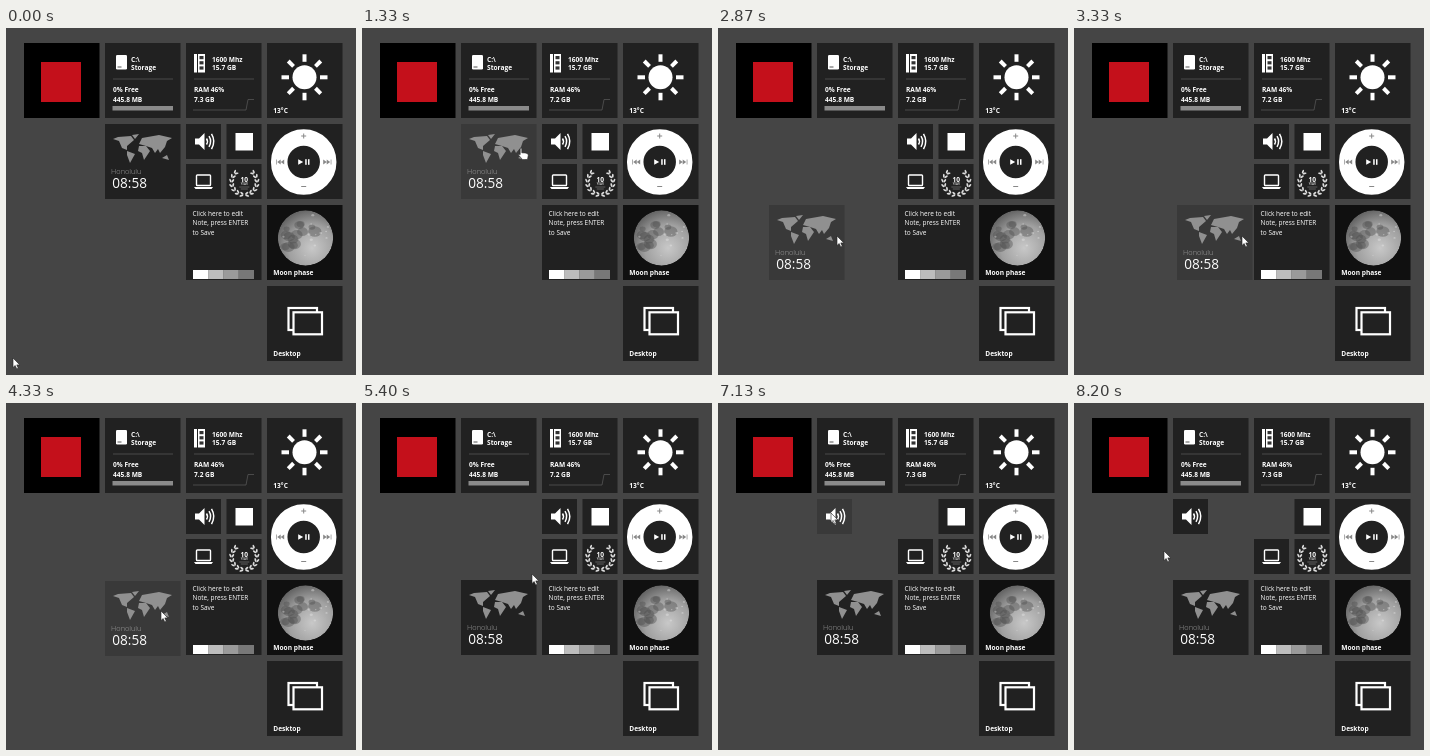
Recreate the animation shown at these times as an HTML page. Size 350 by 347 pixels, loop 9200 ms.

```html
<!DOCTYPE html>
<html lang="en">
<head>
<meta charset="utf-8">
<title>Tile desktop</title>
<style>
  html, body { margin: 0; width: 100%; height: 100%; overflow: hidden; background: #454545; }
  svg { display: block; width: 100%; height: 100%; }
  text { font: 6.5px "Open Sans", "Noto Sans", sans-serif; fill: #fff; }
  .bold { font-size: 6.6px; font-weight: 700; }
  .city { font-size: 7.4px; font-weight: 300; fill: #a0a0a0; }
  .time { font-size: 13.6px; }
  .tile { fill: #212121; }
  .hover .tile { fill: #393939; }
  .white { fill: #fff; }
  .rule { fill: none; stroke: #555; stroke-width: .8; }
</style>
</head>
<body>
<svg viewBox="0 0 350 347">
  <defs>
    <radialGradient id="moonlight" cx=".62" cy=".68" r=".7">
      <stop offset="0" stop-color="#c8c8c8"/>
      <stop offset=".6" stop-color="#a0a0a0"/>
      <stop offset="1" stop-color="#646464"/>
    </radialGradient>
    <clipPath id="disc"><circle r="27.7"/></clipPath>
  </defs>
  <g id="tiles"></g>
  <g id="cursor" fill="#fff" stroke="#222" stroke-width=".6" stroke-linejoin="round">
    <path id="arrow" d="M0 0v9.5l2.2-2 1.5 3.4 1.6-.7-1.5-3.3h3z"/>
    <path id="hand" d="M-.8 .8q.8-1.4 1.6 0v4l3.3 .1 1.700 .5q1.600 .3 1.500 1.800l-.8 4.300h-5l-4-4.500q.2-1.500 1.700-.4z"/>
  </g>
</svg>

<script>
const LOOP = 9200, FPS = 15, PITCH = 81;
const $ = id => document.getElementById(id);

// ---- Drawing helpers ----
const repeat = (n, draw) => Array.from({ length: n }, (_, i) => draw(i)).join("");
const mirrored = content => [-1, 1].map(s => `<g transform="scale(${s} 1)">${content}</g>`).join("");
const at = (x, y, content) => `<g transform="translate(${x} ${y})">${content}</g>`;
const rect = (x, y, w, h, attrs = 'class="white"') =>
  `<rect x="${x}" y="${y}" width="${w}" height="${h}" ${attrs}/>`;
const path = (d, attrs = 'class="white"') => `<path d="${d}" ${attrs}/>`;
const text = (x, y, words, attrs = 'class="bold"') => `<text x="${x}" y="${y}" ${attrs}>${words}</text>`;

const largeTile = (content, attrs = 'class="tile"') => rect(0, 0, 75.5, 75, attrs) + content;
const smallTile = content => rect(0, 0, 35, 35, 'class="tile"') + content;
const cell = (col, row, content) => at(18 + PITCH * col, 15 + PITCH * row, content);

function meter(icon, title, subtitle, label, value, graph) {
  return largeTile(icon + text(26, 18.5, title) + text(26, 26.5, subtitle) +
    path("M8 36h60", 'class="rule"') + text(8, 49, label) + value + graph);
}

// ---- Tile contents ----
const drive = rect(11, 12, 11, 14.5, 'rx="1.3" class="white"') + path("M12.5 24h4", 'stroke="#555"');
const chips = rect(8, 11, 3, 18.5) + rect(12, 11, 7, 18.5) +
  repeat(3, i => rect(13.5, 13 + 5.2 * i, 4, 3.2, 'fill="#333"'));
const storage = meter(drive, "C:\\", "Storage", "0% Free", text(8, 59, "445.8 MB"),
  rect(7.5, 63, 60.5, 4.5, 'fill="#8a8a8a"'));
const memory = meter(chips, "1600 Mhz", "15.7 GB", "RAM 46%", text(8, 59, "", 'id="memory" class="bold"'),
  path("M7 67h53l2-10.5h6", 'class="rule"'));

const weather = largeTile(at(37.5, 34.3, '<circle r="12" class="white"/>' +
  repeat(8, i => path("M0 15.5v7.5", `stroke="#fff" stroke-width="4" transform="rotate(${45 * i})"`))) +
  text(6.3, 70, "13°C"));

const player = largeTile(at(36.7, 38,
  '<circle r="24.5" fill="none" stroke="#fff" stroke-width="16.5"/>' +
  path("M-2.5-26h5M0-28.5v5M-2.5 24.5h5", 'stroke="#888"') +
  mirrored(path("M19.5-2.5v5l3.5-2.5zM23-2.5v5l3.5-2.5zM27-2.5h.7v5h-.7z", 'fill="#888"')) +
  path("M-5.5-2.800v5.600l5-2.800z") + repeat(2, i => rect(1.5 + 2.8 * i, -2.8, 1.5, 5.6))));

function moonSurface() {
  let seed = 11;
  const random = () => (seed = seed * 16807 % 2147483647) / 2147483647;
  return repeat(26, i => {
    const angle = (i < 14 ? 2.6 + 3.2 * random() : 6.28 * random());
    const r = 5 + 20 * random(), size = i < 14 ? 3 + 4 * random() : .6 + 1.2 * random();
    return `<ellipse cx="${r * Math.cos(angle)}" cy="${r * Math.sin(angle)}" rx="${size}" ry="${size * .8}"
      fill="${i < 14 ? "#4c4c4c" : "#e8e8e8"}" opacity=".4"/>`;
  });
}
const moon = largeTile(at(38.5, 33, `<g clip-path="url(#disc)">
  <circle r="27.7" fill="url(#moonlight)"/>${moonSurface()}</g>`) + text(6.3, 70, "Moon phase"), 'fill="#101010"');

const desktop = largeTile(
  repeat(2, i => rect(21.5 + 5 * i, 22 + 4.3 * i, 28.5, 22, 'class="tile" style="stroke:#fff;stroke-width:2.2"')) +
  text(6.3, 69.5, "Desktop"));

const note = largeTile(
  ["Click here to edit", "Note, press ENTER", "to Save"].map((line, i) => text(6.5, 11 + 9.3 * i, line, "")).join("") +
  ["#fff", "#bdbdbd", "#9a9a9a", "#787878"].map((c, i) => rect(7 + 15.2 * i, 65, 15.4, 9, `fill="${c}"`)).join(""));

const laptop = smallTile(rect(10.5, 11, 14, 10.5, 'rx=".8" fill="none" stroke="#fff" stroke-width="1.4"') +
  path("M8 23h19l-1.500 2h-16z"));

const leaves = repeat(14, i => {
  const angle = 78 - 21 * (i >> 1), outer = i % 2;
  return `<ellipse rx=".9" ry="2" fill="#ddd"
    transform="rotate(${angle}) translate(${11.5 + 2.5 * outer}) rotate(${outer ? 28 : -28})"/>`;
});
const award = smallTile(at(17.8, 18, mirrored(leaves) +
  text(0, -.5, "10", 'class="bold" text-anchor="middle"') +
  text(0, 3, "YEAR", 'text-anchor="middle" style="font-size:3px"') +
  path("M-5 5h10M-3.500 7h7", 'stroke="#777" stroke-width=".7"')));

const worldMap = path(`M8 15l5-2 13-1 3 4-7 6v4l-5-2-3-7z M27 11l7-1-4 5z M22 27l8 3-5 9-3-8z
  M34 20l3-6 17-3 13 3-5 3-2 6-5 6-2-4-3 4-3-5-6-2z M34 22h7l4 5-6 9-2-7-4-2z M57 34l5-3 2 5z`, 'fill="#909090"');
const clock = largeTile(worldMap + text(6, 49.5, "Honolulu", 'class="city"') + text(7.3, 63.5, "08:58", 'class="time"'));

const volume = smallTile(path("M9 14.500h4l5.500-5.500v17l-5.500-5.500h-4z") +
  repeat(3, i => path(`M${20.5 + 2.5 * i} ${14.5 - 2.3 * i}q${2 + 1.3 * i} ${3 + 2.3 * i} 0 ${6 + 4.6 * i}`,
    'fill="none" stroke="#fff" stroke-width="1.5"')));

$("tiles").innerHTML =
  cell(0, 0, largeTile(rect(17, 19, 40, 40, 'fill="#c4101b"'), "")) +
  cell(1, 0, storage) + cell(2, 0, memory) + cell(3, 0, weather) +
  cell(2, 1, at(40.5, 0, smallTile(rect(9, 9, 17.5, 17.5))) + at(0, 40, laptop) + at(40.5, 40, award)) +
  cell(3, 1, player) + cell(2, 2, note) + cell(3, 2, moon) + cell(3, 3, desktop) +
  `<g id="clock">${clock}</g><g id="volume">${volume}</g>`;

// ---- Motion: eased between a few stops [time, x, y] ----
const clockStops = [[1300, 99, 96], [2000, 36, 166], [2130, 36, 166], [2800, 49, 177],
  [3330, 103, 177], [3930, 99, 176], [4330, 99, 178], [4670, 99, 177]];
const volumeStops = [[5870, 180, 96], [6470, 95, 96], [6930, 99, 96]];
const pointerStops = [[0, 7, 330], [930, 159, 120], [1300, 159, 120], [2000, 98, 189], [2130, 98, 189],
  [2800, 117, 208], [3330, 168, 208], [3930, 155, 208], [5070, 155, 208], [5870, 195, 109]];
const GRIP = 14;

function positionAt(stops, t) {
  const next = stops.findIndex(stop => stop[0] > t);
  if (next < 0) return stops.at(-1).slice(1);
  if (next === 0) return stops[0].slice(1);
  const [t0, x0, y0] = stops[next - 1], [t1, x1, y1] = stops[next];
  const p = (t - t0) / (t1 - t0), eased = p * p * (3 - 2 * p);
  return [x0 + (x1 - x0) * eased, y0 + (y1 - y0) * eased];
}

function pointerAt(t) {
  if (t < 5870) return positionAt(pointerStops, t);
  const [x, y] = positionAt(volumeStops, t);
  const held = [x + GRIP, y + GRIP];
  return t < 7930 ? held : positionAt([[7930, ...held], [8200, 90, 148]], t);
}

function place(id, [x, y]) {
  $(id).setAttribute("transform", `translate(${Math.round(x)} ${Math.round(y)})`);
}

function updateTile(id, [x, y], size, [px, py], dragged) {
  const hovered = px >= x && px < x + size && py >= y && py < y + size;
  place(id, [x, y]);
  $(id).setAttribute("class", hovered || dragged ? "hover" : "");
  return hovered && !dragged;
}

function draw() {
  const now = performance.now() % LOOP;
  const t = Math.floor((now + 5) * FPS / 1000) * 1000 / FPS;
  const pointer = pointerAt(t);
  const clockDrag = t > 1350 && t < 4600, volumeDrag = t > 5870 && t < 7700;
  const overClock = updateTile("clock", positionAt(clockStops, t), 75, pointer, clockDrag);
  const overVolume = updateTile("volume", positionAt(volumeStops, t), 35, pointer, volumeDrag);
  const showHand = overClock || overVolume;
  place("cursor", pointer);
  $("hand").style.display = showHand ? "" : "none";
  $("arrow").style.display = showHand ? "none" : "";
  $("memory").textContent = t > 1130 && t < 7130 ? "7.2 GB" : "7.3 GB";
  requestAnimationFrame(draw);
}
draw();
</script>
</body>
</html>
```
